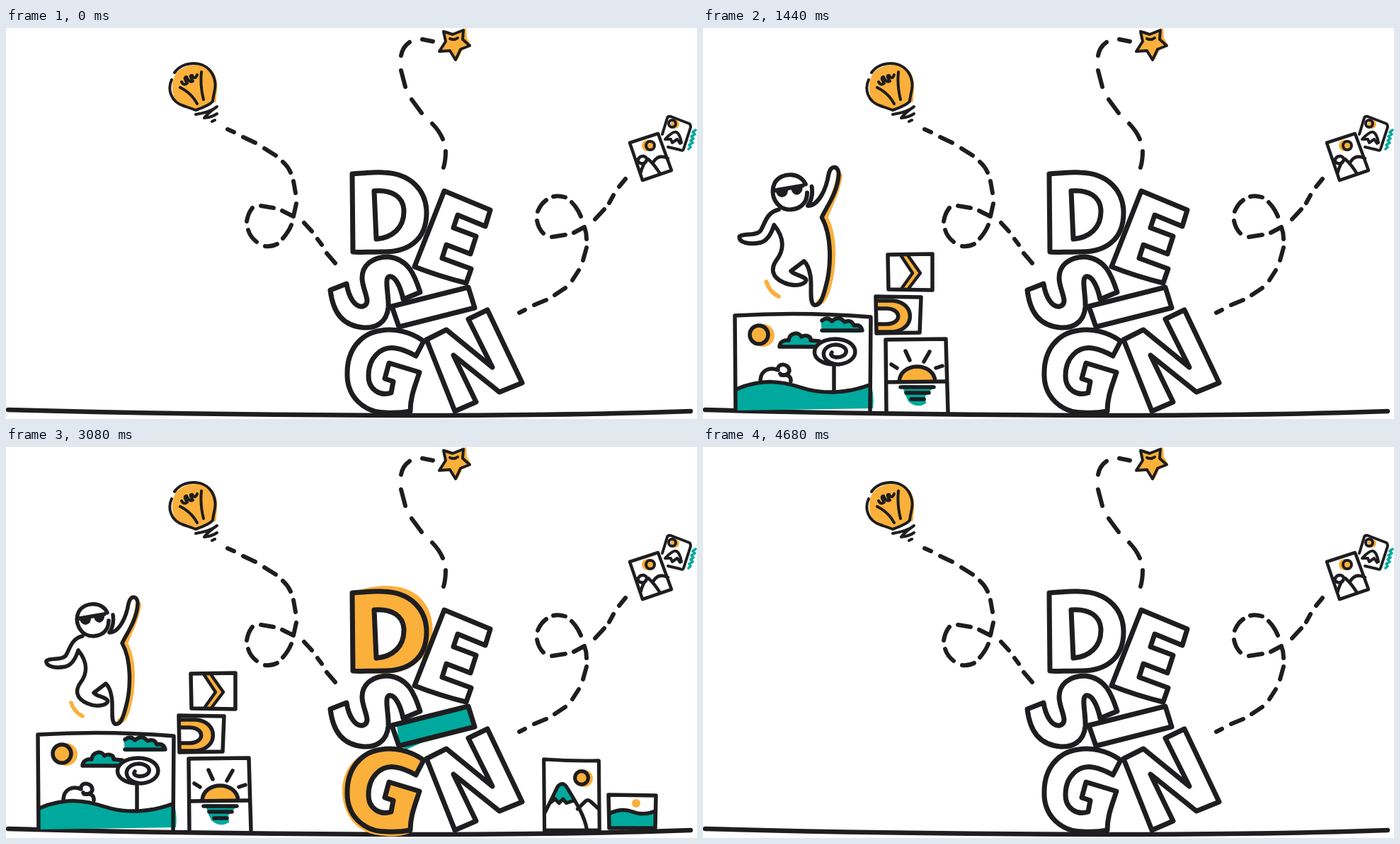
Write an HTML page that moves like this. It is 976 by 552 pixels and loops after 4.8 s.

```html
<!DOCTYPE html>
<html lang="en">
<head>
<meta charset="utf-8">
<title>Design</title>
<style>
  html, body { margin: 0; width: 100%; height: 100%; overflow: hidden; background: #fff; }
  svg { display: block; width: 976px; height: 552px; }
  path, circle { fill: none; stroke: #1e1d1f; stroke-width: 5.5; stroke-linecap: round; stroke-linejoin: round; }
  .o { fill: #fbb03b; stroke: none; }
  .t { fill: #00a99d; stroke: none; }
  .w { fill: #fff; }
  .k { fill: #1e1d1f; stroke: none; }
  .ol { stroke: #fbb03b; }
  .tl { stroke: #00a99d; stroke-width: 3.5; }
  .letter { stroke-width: 7; }
  .thin { stroke-width: 4; }
  .dash { stroke-width: 6; }
</style>
</head>
<body>
<svg viewBox="0 0 976 552">
  <path style="stroke-width:6.5" d="M3 539Q250 546 560 547Q800 547 967 541"/>

  <!-- dashed trails -->
  <path class="dash" d="M603 19L588 16M570 20Q560 27 558 39M558 60L564 83M573 101L587 120M602 135Q612 145 617 157M621 174Q621 187 618 197"/>
  <path class="dash" d="M313 143L322 147M335 154L352 162M365 170L381 180M391 189Q398 195 402 204M406 216L409 233M410 248L406 266L390 258M378 254L360 251M348 254Q342 261 340 273M342 285Q345 295 354 302M366 308Q375 309 383 305M391 297Q399 288 403 278M421 275L432 287M440 298L446 306M453 318L465 332"/>
  <path class="dash" d="M875 213L866 224M858 236L852 247M845 256L832 270M802 289L817 281Q820 289 820 298M790 292L771 295M759 290Q752 283 750 272M751 259Q755 249 763 243M773 238Q780 236 790 239M799 246Q807 254 812 266M820 310L815 328M809 342L800 356M790 367L775 377M763 384L746 391M733 398L725 402"/>

  <!-- bulb -->
  <path class="o" d="M240 64C252 49 282 48 294 64C302 80 296 94 297 104L270 115L248 109C232 100 232 78 240 64Z"/>
  <path class="thin" d="M238 63C250 46 280 45 291 64C300 80 293 91 292 103Q290 108 268 116Q260 113 251 110C232 104 228 86 234 73"/>
  <path class="thin" d="M246 84Q262 92 270 107M276 62Q274 82 279 101M248 76Q251 82 256 78Q250 69 255 69Q259 78 264 75Q258 66 263 67Q267 74 270 66M268 122Q288 119 298 111Q285 120 280 127Q291 126 298 121M291 132L295 130"/>

  <!-- star -->
  <path class="o" d="M622 3L633 9L650 0L651 14L657 24L645 31L638 45L627 34L613 35L620 20Z"/>
  <path class="thin" d="M618 5L631 9L646 3L645 16L655 25L642 30L635 45L627 32L612 33L621 19ZM627 15Q633 18 638 14"/>

  <!-- flying photos -->
  <circle class="o" cx="906" cy="166" r="8"/>
  <path style="stroke-width:4.5" d="M881 162L921 149L940 201L899 215ZM896 206Q900 190 907 185Q916 193 924 206M892 188Q894 180 901 181Q908 184 903 190Q896 194 892 187M914 190Q921 177 935 184"/>
  <circle class="o thin" style="stroke:#1e1d1f" cx="910" cy="166" r="6"/>
  <circle class="o" cx="945" cy="136" r="6"/>
  <path class="thin" d="M927 150L934 127Q935 124 939 125L965 135Q967 136 967 140L957 171Q956 174 952 172L935 168M931 157Q942 145 947 147Q952 150 954 162M932 157L939 157L941 162L948 157L952 163"/>
  <circle class="thin" cx="941" cy="135" r="5"/>
  <path class="tl" d="M974 144L970 147L973 150L968 153L971 156L967 159L970 162L965 165L967 168L964 171"/>

  <!-- lettering with its colour fills -->
  <g id="fillD"><path class="o" fill-rule="evenodd" d="M490 205C508 198 530 194 550 197C590 202 606 235 602 266C597 301 570 318 535 320L492 318ZM521 230C545 228 562 238 562 259C562 282 546 298 523 298Z"/></g>
  <path class="letter" d="M489 206C505 205 519 203 533 204C572 205 594 230 594 261C594 300 567 317 531 316C515 316 502 317 490 316ZM520 230C545 228 562 238 562 259C562 282 546 296 523 298Z"/>
  <path class="letter w" d="M619 230L684 257L677 280L638 264L632 282L664 294L656 319L622 306L616 325L657 340L650 360Q613 351 577 337Z"/>
  <g id="fillI"><path class="t" d="M552 391L646 369Q657 368 658 376L661 392Q640 402 606 409L566 427L555 421Z"/></g>
  <path class="letter" d="M545 393L653 366L662 395L555 422Z"/>
  <path class="letter w" d="M458 370L481 361C484 380 493 395 504 393C518 389 503 370 503 353C503 333 520 323 540 323C568 326 577 348 585 373L561 383C557 364 549 349 541 351C534 354 541 377 540 394C538 417 521 424 505 423C475 420 462 402 458 370Z"/>
  <g id="fillG"><path class="o" d="M588 443C570 430 545 427 525 428C490 432 474 460 475 488C477 525 500 548 535 549Q555 551 570 545L584 486L541 473L535 495L547 499L544 515C530 520 512 512 512 491C512 465 530 449 550 452Q563 454 579 463Z"/></g>
  <path class="letter" d="M590 442C570 428 548 424 530 427C500 431 482 455 482 487C481 520 505 543 537 543Q555 544 571 541C571 520 578 505 584 486L541 473L535 495L547 499L544 515C530 520 512 512 512 491C512 465 530 449 550 452Q563 454 579 463Z"/>
  <path class="letter w" d="M594 440L622 426L687 479L653 411L680 398L729 501L697 514L632 462L664 528L634 541Z"/>

  <g id="landscape">
    <path class="t" d="M46 512C80 496 110 498 135 508C170 519 205 517 238 505Q242 520 240 537L46 540Z"/>
    <path d="M47 510C85 494 112 499 140 508C170 518 205 515 235 504"/>
    <circle class="o" cx="85" cy="434" r="16"/>
    <circle cx="79" cy="433" r="13"/>
    <path class="t" d="M108 451C108 443 115 440 121 441C122 430 135 428 139 436C146 432 153 436 152 441L168 443L164 453Z"/>
    <path d="M160 450L108 450C108 443 115 440 121 441C122 430 135 428 139 436C146 432 153 436 152 441L164 442"/>
    <path class="t" d="M166 409L168 430L222 430L225 425Q223 418 213 420Q210 411 200 415Q192 405 182 414Q176 407 166 413Z"/>
    <path d="M168 427L225 427Q223 418 213 420Q210 411 200 415Q192 405 182 414Q176 407 168 413"/>
    <path class="w" d="M185 475C148 474 148 440 187 439C223 440 224 472 191 475C164 473 164 448 188 447C208 449 206 465 188 465Q178 463 182 458"/>
    <path d="M185 475L185 514M81 497C82 483 94 478 106 483C104 472 122 473 122 484C121 490 112 492 109 488M110 490Q125 488 124 499"/>
    <path d="M46 539L45 406Q140 400 237 408L236 540"/>
  </g>
  <g id="sunrise">
    <path class="t" d="M282 504L328 505L314 520L315 530Q302 538 290 527L284 514Z"/>
    <path class="o" d="M277 499C279 471 326 471 328 499Z"/>
    <path d="M277 499C279 471 326 471 328 499M286 456L292 469M320 457L312 471M266 475L274 480M329 480L338 477M260 500L343 499"/>
    <path d="M279 507H326M287 515H319M294 524H312"/>
    <path d="M259 541L258 440L343 439L346 541"/>
  </g>
  <g id="arch">
    <path class="o" d="M246 386L268 385C300 387 301 426 268 429L246 428V418H260C281 417 281 397 260 396H246Z"/>
    <path d="M247 385H268C300 387 301 426 268 429H247M247 396H260C281 397 281 417 260 418H247"/>
    <path d="M244 379L308 380L306 430L245 431Z"/>
  </g>
  <g id="chevron">
    <path class="o" d="M280 322H290L307 346L291 367H281L296 346Z"/>
    <path style="stroke-width:4.5" d="M280 322L296 346L281 367M290 322L307 346L291 367"/>
    <path d="M261 320L324 319L324 370L262 369Z"/>
  </g>
  <g id="jumper">
    <path class="ol" style="stroke-width:8" d="M187 223C184 246 172 264 168 278C181 300 180 340 172 368Q168 384 161 387"/>
    <path class="ol" d="M92 361Q96 374 108 380"/>
    <path d="M143 234C136 218 112 218 103 232C95 248 106 268 124 267C138 266 145 257 145 245M104 242L139 236"/>
    <path class="k" d="M104 242L120 239Q121 250 112 251Q105 250 104 242ZM124 239L139 236Q140 246 132 248Q125 247 124 239Z"/>
    <path d="M151 237C153 250 149 257 146 262C160 262 170 240 173 221C176 207 187 211 186 222C185 244 170 264 164 277C177 300 177 340 169 368C164 388 160 392 154 391C147 387 152 365 149 352Q147 340 141 334L124 347C128 352 137 352 143 357C147 363 130 369 115 362C98 355 98 343 105 333C115 320 116 304 102 287C98 300 92 308 84 310C70 313 56 310 57 302C62 297 77 302 84 295C90 287 91 271 108 267"/>
  </g>
  <g id="mountain">
    <circle class="o" cx="818" cy="463" r="13"/>
    <circle cx="814" cy="462" r="10"/>
    <path class="t" d="M763 508L779 475Q785 468 790 476L804 496L791 500L786 494L780 500L774 494Z"/>
    <path d="M759 514L778 475Q785 467 791 475C805 498 818 518 822 540M808 509L820 497Q824 494 828 498L840 509M766 500L774 494L780 500L786 494L791 500L803 496"/>
    <path d="M758 541L757 434Q800 437 840 436L841 541Z"/>
  </g>
  <g id="seascape">
    <path class="t" d="M853 518Q870 510 885 516T917 514V537H853Z"/>
    <circle class="o" cx="890" cy="503" r="6"/>
    <path d="M853 517Q870 509 885 515T917 514"/>
    <path d="M851 491L918 492L917 538L852 538Z"/>
  </g>
</svg>
<script>
  // id, pivot x, pivot y, resting scale; listed in order of appearance
  const items = [
    ['landscape', 141, 540], ['sunrise', 301, 541], ['arch', 244, 431], ['chevron', 261, 370],
    ['jumper', 121, 391], ['fillD', 546, 258], ['fillI', 606, 397], ['fillG', 530, 488],
    ['mountain', 798, 541, .936], ['seascape', 885, 538]
  ].map(([id, x, y, size = 1]) => ({ node: document.getElementById(id), x, y, size }));

  const LOOP = 4800, STEP = 40, LAST = 4680;
  const enter = { start: 306, gap: 234, length: 400 };
  const leave = { start: 3398, gap: 117, length: 200 };

  const clamp = v => Math.min(1, Math.max(0, v));
  const backIn = p => 2.70158 * p ** 3 - 1.70158 * p ** 2;
  const progress = (phase, order, t) => clamp((t - phase.start - order * phase.gap) / phase.length);

  function draw(t) {
    items.forEach(({ node, x, y, size }, i) => {
      const shown = progress(enter, i, t);
      const gone = progress(leave, items.length - 1 - i, t);
      const scale = size * (gone > 0 ? 1 - backIn(gone) : 1 - backIn(1 - shown));
      const visible = shown > 0 && gone < 1;
      node.style.display = visible ? '' : 'none';
      if (visible) node.setAttribute('transform', `translate(${x} ${y}) scale(${scale}) translate(${-x} ${-y})`);
    });
  }

  const origin = performance.now();
  function tick() {
    const t = (performance.now() - origin) % LOOP;
    draw(Math.min(LAST, Math.floor(t / STEP) * STEP));
    requestAnimationFrame(tick);
  }
  tick();
</script>
</body>
</html>
```
